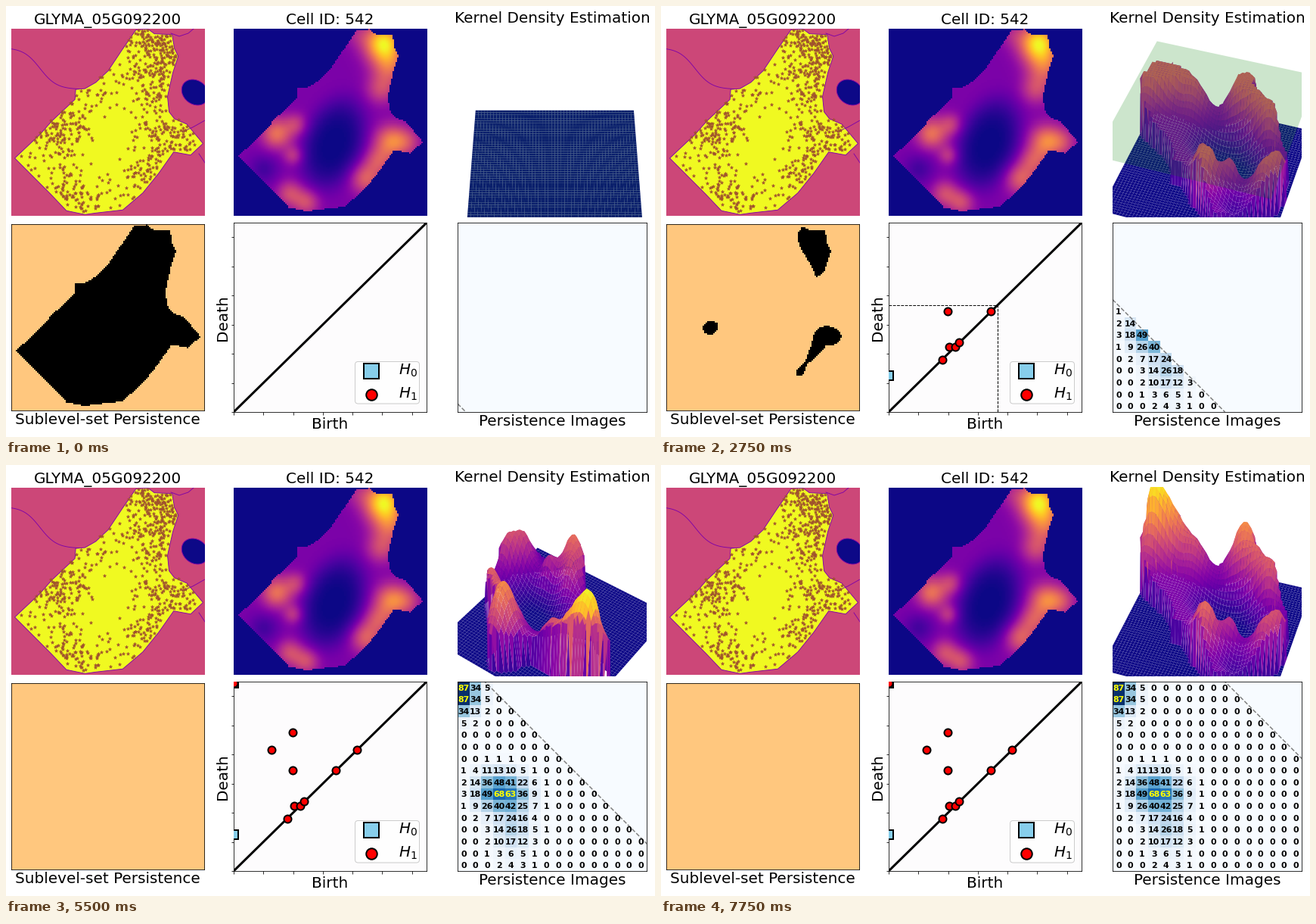
A matplotlib script that plays this animation: 858 px wide and 569 px high, repeating every 8000 ms.

```python
import numpy as np
import matplotlib.pyplot as plt
from matplotlib.animation import FuncAnimation
from matplotlib.collections import PolyCollection
from matplotlib.patches import Ellipse, FancyBboxPatch, Polygon
from matplotlib.path import Path

W, H, DPI = 858, 569, 72
FRAMES, INTERVAL = 32, 250
PW, PH = 256, 247            # size of the image panels
NX, NY = 128, 123            # density grid
PEAK, LIMIT = 19.34, 19.5    # highest density, diagram range
CELLS = 16                   # persistence image grid
SPIN = 18                    # degrees per step
HALF, FLOOR, RISE = 0.8595, -0.713, 0.0721

# key points of the cell wall
OUTLINE = np.array([
    (163, 2), (179, 1), (187, 7), (210, 8), (213, 26), (218, 36), (211, 57),
    (204, 88), (206, 108), (213, 117), (229, 124), (250, 149), (234, 164),
    (212, 160), (193, 187), (172, 213), (146, 235), (111, 239), (97, 241),
    (73, 236), (53, 215), (6, 168), (39, 137), (54, 120), (84, 92), (85, 79),
    (97, 78), (111, 70), (127, 55), (145, 28)], float)

# hot spots over the rim: x, y, spread, weight
SPOTS = [
    (198, 19, 17.5, .72), (206, 50, 16, .32), (195, 80, 14, .25),
    (163, 8, 12, .1), (208, 148, 15, .43), (230, 149, 13, .2),
    (192, 174, 13, .27), (175, 198, 14, .33), (57, 138, 14, .4),
    (82, 126, 10, .2), (79, 167, 9, .2), (74, 217, 12, .26),
    (96, 229, 12, .27), (40, 185, 14, -.14)]

# birth, death
LOOPS = np.array([
    (5.4, 5.4), (6.12, 6.7), (6.7, 6.7), (7.12, 7.18), (5.97, 10.37),
    (10.33, 10.37), (12.47, 12.48), (3.83, 12.48), (5.97, 14.3), (0, PEAK)])
PARTS = np.array([(0, 3.74), (0, PEAK)])


def make_density():
    """Low core, even rim and a few hot spots, cut to the cell."""
    u, v = np.meshgrid((np.arange(NX) + .5) * PW / NX,
                       (np.arange(NY) + .5) * PH / NY)
    inside = Path(OUTLINE).contains_points(np.c_[u.ravel(), v.ravel()])
    inside = inside.reshape(u.shape)
    du, dv = u - 132, v - 152
    core = ((.35 * du - .94 * dv) / 62) ** 2 + ((.94 * du + .35 * dv) / 40) ** 2
    d = .25 * (1 - np.exp(-core ** 2))
    for x, y, s, a in SPOTS:
        d += a * np.exp(-((u - x) ** 2 + (v - y) ** 2) / (2 * s * s))
    d = np.where(inside, d.clip(0), 0)
    return u, v, inside, d * PEAK / d.max()


def make_counts():
    """Blur of the loops in birth-persistence space, weighted by persistence."""
    unit = PEAK / 15
    row, col = np.mgrid[:CELLS, :CELLS] + .5
    total = np.zeros((CELLS, CELLS))
    for birth, death in LOOPS:
        life = death - birth
        r2 = (col - birth / unit) ** 2 + (row - life / unit) ** 2
        total += 110 * life / PEAK * np.exp(-r2 / 2.13)
    return np.rint(total).astype(int)


U, V, inside, density = make_density()
counts = make_counts()
reach = np.add.outer(np.arange(CELLS), np.arange(CELLS)) + 1

fig = plt.figure(figsize=(W / DPI, H / DPI), dpi=DPI, facecolor="white")


def panel(x, y, w, h, xlim, ylim, frame=True):
    ax = fig.add_axes([x / W, 1 - (y + h) / H, w / W, h / H])
    ax.set(xlim=xlim, ylim=ylim, xticks=[], yticks=[])
    if not frame:
        ax.axis("off")
    return ax


def picture(ax, data, **kw):
    return ax.imshow(data, extent=(0, PW, PH, 0), aspect="auto",
                     interpolation="nearest", **kw)


image_lims = (0, PW), (PH, 0)
cell_ax = panel(7, 30, 256, 247, *image_lims, frame=False)
heat_ax = panel(301, 30, 256, 247, *image_lims, frame=False)
kde_ax = panel(597, 28.6, 250, 250.4, (-.095, .09), (-.095, .09), frame=False)
level_ax = panel(7, 288, 255.4, 246, *image_lims)
diag_ax = panel(301, 286, 255.2, 250, (0, LIMIT), (0, LIMIT))
pers_ax = panel(597, 286, 250.2, 250, (0, CELLS), (0, CELLS))
page = panel(0, 0, W, H, (0, W), (H, 0), frame=False)

# Cell with its transcripts
purple = plt.get_cmap("plasma")(.25)
cell_ax.add_patch(plt.Rectangle((0, 0), PW, PH, fc="#cc4778", lw=0))
s = np.linspace(0, 90, 40)
cell_ax.plot(s, 25 + 55 / (1 + np.exp((38 - s) / 11)), color=purple, lw=.9)
for line in [[(211, 6), (222, 10), (234, 6), (241, 0)],
             [(226, 136), (240, 130), (256, 121)],
             [(248, 165), (256, 177)]]:
    cell_ax.plot(*zip(*line), color=purple, lw=.9)
middle = np.array([128, 123])
cell_ax.add_patch(Polygon((OUTLINE - middle) * 1.02 + middle + (1, 2),
                          fc="#f0f921", ec=purple, lw=.9))
cell_ax.add_patch(Ellipse((243, 84), 38, 31, angle=38, fc="#0d0887",
                          ec=purple, lw=.9))
rng = np.random.default_rng(5)
chance = density.ravel() ** 1.2
picks = rng.choice(density.size, 720, p=chance / chance.sum())
jitter = rng.uniform(-1, 1, (2, picks.size))
cell_ax.scatter(U.ravel()[picks] + jitter[0], V.ravel()[picks] + jitter[1],
                marker="*", s=20, c="sienna", linewidths=.5, zorder=3)

# Density map and its level sets
picture(heat_ax, density, cmap="plasma")
level_img = picture(level_ax, inside, cmap="copper", vmin=0, vmax=1)

# Density surface
rows = np.linspace(0, NY - 1, 53).astype(int)
cols = np.linspace(0, NX - 1, 55).astype(int)
mesh_z = density[np.ix_(rows, cols)]
mesh_x, mesh_y = np.meshgrid(np.linspace(-HALF, HALF, cols.size),
                             np.linspace(HALF, -HALF, rows.size))
surface = PolyCollection([], cmap="plasma", linewidths=0, edgecolors="none")
surface.set_clim(0, PEAK)
kde_ax.add_collection(surface, autolim=False)
plane = Polygon(np.zeros((4, 2)), fc="green", alpha=.2, lw=0, zorder=2)
kde_ax.add_patch(plane)


def project(x, y, z, azim):
    """Perspective view from 45 degrees up; returns x, y and nearness."""
    c, s = np.cos(azim), np.sin(azim)
    height = FLOOR + RISE * z
    near = x * c + y * s
    depth = (near + height) / np.sqrt(2)
    scale = 1 / (10 - depth)
    return ((y * c - x * s) * scale,
            (height - near) / np.sqrt(2) * scale, depth)


def corners(a):
    return np.stack([a[:-1, :-1], a[:-1, 1:], a[1:, 1:], a[1:, :-1]],
                    -1).reshape(-1, 4)


# Persistence diagram
diag_ax.set_facecolor("#fdfcfd")
diag_ax.set_xticks(range(0, 20, 3))
diag_ax.set_yticks(range(0, 20, 3))
diag_ax.tick_params(labelleft=False, labelbottom=False)
diag_ax.plot([0, LIMIT], [0, LIMIT], color="black", lw=3)
guide, = diag_ax.plot([], [], "--", color="black", lw=1)
part_style = dict(marker="s", mfc="skyblue", mec="black", mew=2, ls="")
loop_style = dict(marker="o", mfc="red", mec="black", mew=2, ls="")
part_dots, = diag_ax.plot([], [], ms=12, zorder=3, **part_style)
loop_dots, = diag_ax.plot([], [], ms=10, zorder=4, **loop_style)

page.add_patch(FancyBboxPatch(
    (461.5, 469.5), 85, 55.5, fc=(1, 1, 1, .8), ec="0.8", lw=1,
    boxstyle="round,pad=0,rounding_size=4"))
page.plot(483, 481.5, ms=20, **part_style)
page.plot(483, 513, ms=14.5, **loop_style)
page.text(519, 487, "$H_0$", fontsize=20)
page.text(519, 518, "$H_1$", fontsize=20)

# Persistence image
pers_img = pers_ax.imshow(counts * 0, cmap="Blues", vmin=0, vmax=87,
                          origin="lower", extent=(0, CELLS, 0, CELLS),
                          aspect="auto", interpolation="nearest")
front, = pers_ax.plot([], [], "--", color="gray", lw=1.5)
numbers = [pers_ax.text(i + .5, j + .5, str(n), fontsize=11,
                        weight="bold", ha="center", va="center_baseline",
                        color="yellow" if n > 55 else "black")
           for (j, i), n in np.ndenumerate(counts)]

for x, y, text in [(134.5, 24, "GLYMA_05G092200"),
                   (428.5, 24, "Cell ID: 542"),
                   (722.5, 22, "Kernel Density Estimation"),
                   (134.5, 552.5, "Sublevel-set Persistence"),
                   (428.5, 558, "Birth"),
                   (722.5, 554, "Persistence Images")]:
    page.text(x, y, text, fontsize=20, ha="center")
page.text(291.5, 412, "Death", fontsize=20, rotation=90, ha="center",
          rotation_mode="anchor")


def update(k):
    azim = np.radians(SPIN * k)
    growing = k <= PEAK

    z = np.minimum(mesh_z, k)
    x, y, depth = project(mesh_x, mesh_y, z, azim)
    order = np.argsort(corners(depth).mean(1))
    surface.set_verts(np.stack([corners(x), corners(y)], -1)[order])
    surface.set_array(corners(z).mean(1)[order])

    square = HALF * np.array([(-1, -1), (1, -1), (1, 1), (-1, 1)])
    px, py, _ = project(square[:, 0], square[:, 1], k, azim)
    plane.set_xy(np.c_[px, py])
    plane.set_visible(growing)

    level_img.set_data(~(inside & (density >= k)))

    guide.set_data([0, k, k], [k, k, 0])
    guide.set_visible(growing)
    loop_dots.set_data(*LOOPS[LOOPS[:, 1] <= k].T)
    part_dots.set_data(*PARTS[PARTS[:, 1] <= k].T)

    edge = .8 * k + .7
    front.set_data([0, edge], [edge, 0])
    shown = reach <= edge
    pers_img.set_data(np.where(shown, counts, 0))
    for number, on in zip(numbers, shown.ravel()):
        number.set_visible(on)


anim = FuncAnimation(fig, update, frames=FRAMES, init_func=lambda: update(0),
                     interval=INTERVAL, repeat=True, repeat_delay=0)
plt.show()
```
